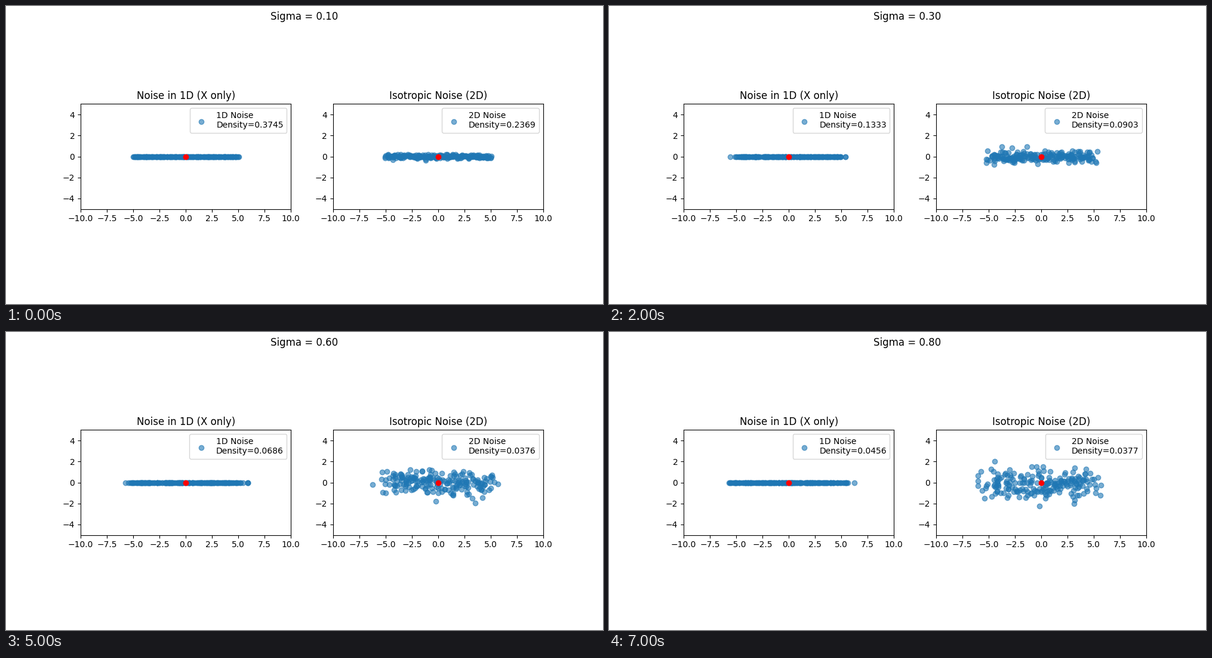
A matplotlib script for the animation above (8 s loop, 1000 by 500 pixels).

```python
import matplotlib.pyplot as plt
import numpy as np
from matplotlib.animation import FuncAnimation

COUNT = 200
BASE = np.linspace(-5, 5, COUNT)

# Label readings (1D, 2D) for sigma = 0.1, 0.2, ...
DENSITIES = [(0.3745, 0.2369), (0.1995, 0.1411), (0.1333, 0.0903),
             (0.0997, 0.0705), (0.0760, 0.0652), (0.0686, 0.0376),
             (0.0616, 0.0376), (0.0456, 0.0377)]


def sample(step, sigma):
    """Points on a line, blurred along x only and in both directions."""
    rng = np.random.default_rng(step)
    x_line, x_cloud, y_cloud = rng.normal(0, sigma, (3, COUNT))
    line = np.column_stack([BASE + x_line, np.zeros(COUNT)])
    cloud = np.column_stack([BASE + x_cloud, y_cloud])
    return line, cloud


def make_panel(ax, title):
    dots = ax.scatter(BASE, 0 * BASE, alpha=0.6, label="Noise\nDensity")
    ax.plot(0, 0, "ro")
    ax.set(xlim=(-10, 10), ylim=(-5, 5), aspect="equal", title=title)
    return dots, ax.legend(loc="upper right").get_texts()[0]


fig, axes = plt.subplots(1, 2, figsize=(10, 5), dpi=100)
heading = fig.suptitle("", y=0.982)
panels = [make_panel(axes[0], "Noise in 1D (X only)"),
          make_panel(axes[1], "Isotropic Noise (2D)")]


def update(step):
    sigma = 0.1 * (step + 1)
    heading.set_text(f"Sigma = {sigma:.2f}")
    rows = zip(panels, sample(step, sigma), DENSITIES[step], ("1D", "2D"))
    for (dots, label), points, density, name in rows:
        dots.set_offsets(points)
        label.set_text(f"{name} Noise\nDensity={density:.4f}")


anim = FuncAnimation(fig, update, frames=8, interval=1000, repeat=True)
plt.show()
```
